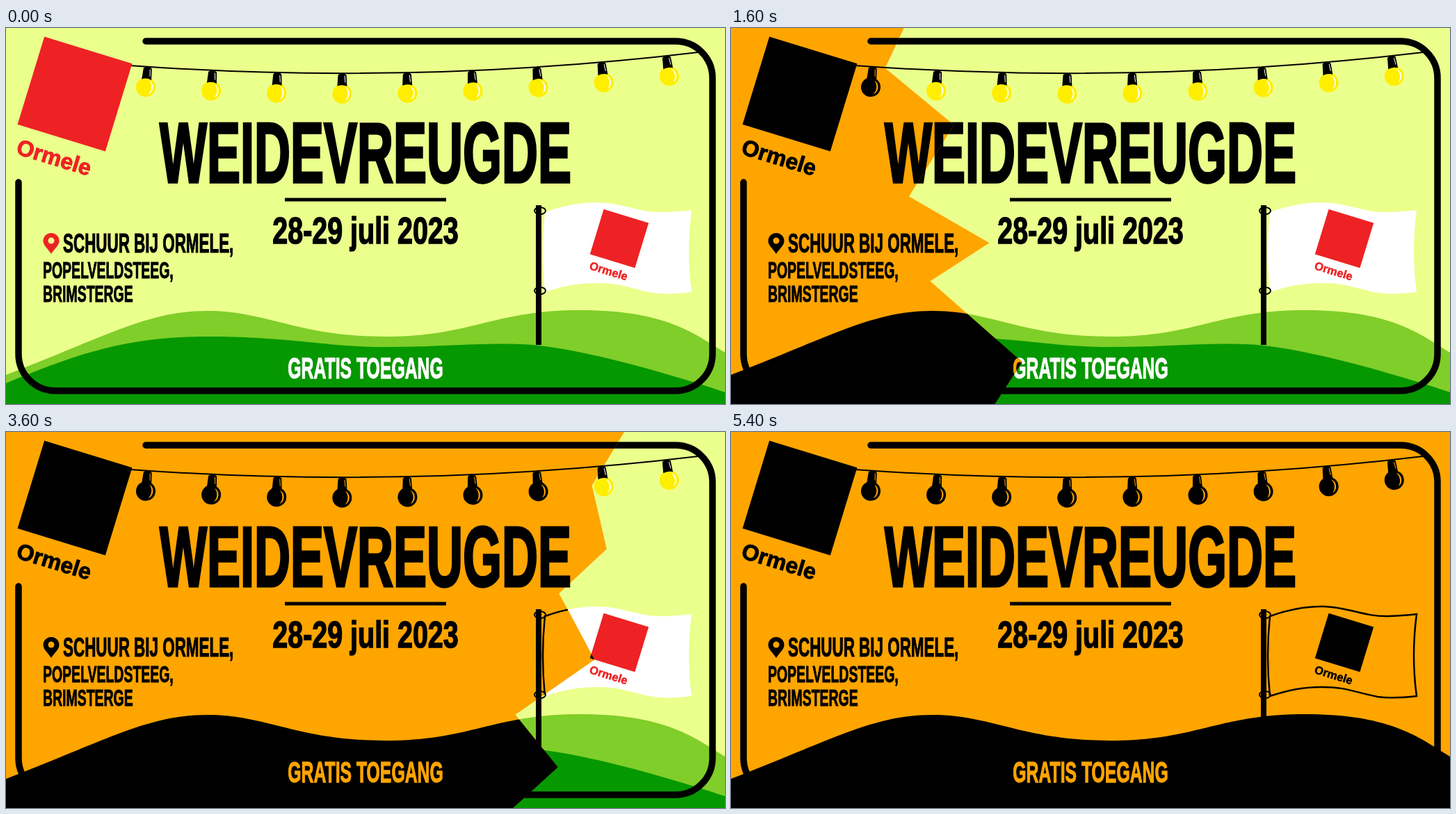
Recreate the animation shown at these times as an HTML page. Size 1034 by 541 pixels, loop 5.6 s.

```html
<!DOCTYPE html>
<html lang="nl">
<head>
<meta charset="utf-8">
<style>
  html, body { margin: 0; width: 100%; height: 100%; overflow: hidden; }
  svg { display: block; width: 1034px; height: 541px; }
  text { font-family: "Liberation Sans", Arial, sans-serif; font-weight: bold; stroke-width: .03em; }
</style>
</head>
<body>
<svg id="stage" viewBox="0 0 1034 541"></svg>
<script>
const HEIGHT = 541, LOOP = 5600, STEP = 200, LAST_STEP = LOOP / STEP - 1;
const CONDENSED = 0.59, SEMI_CONDENSED = 0.73;
const BULBS = 9, JAGS = 7;

const day = {
  sky: '#ebff8c', backHill: '#80ce29', frontHill: '#069800', accent: '#ee2224',
  bulb: '#ffee00', shine: '#fff', flag: '#fff', flagLine: 'none', entry: '#fff'
};
const night = {
  sky: '#ffa500', backHill: '#000', frontHill: '#000', accent: '#000',
  bulb: '#000', shine: '#ffa500', flag: '#ffa500', flagLine: '#000', entry: '#ffa500'
};

const label = (x, y, size, words, { color = '#000', anchor = 'start', squeeze = CONDENSED } = {}) =>
  `<text transform="translate(${x} ${y}) scale(${squeeze} 1)" font-size="${size}"
    text-anchor="${anchor}" fill="${color}" stroke="${color}">${words}</text>`;

// The wire hangs as a parabola from left to right
const wire = { left: 178, right: 995, from: 54, pull: 83.5, to: 35 };
const wireMiddle = (wire.left + wire.right) / 2;
function wireY(x) {
  const t = (x - wire.left) / (wire.right - wire.left);
  return (1 - t) ** 2 * wire.from + 2 * t * (1 - t) * wire.pull + t * t * wire.to;
}

function lamp(i, c) {
  const x = 201 + 94.1 * i;
  return `
  <g transform="translate(${x} ${wireY(x) + 29.5}) rotate(${6 - 1.8 * i})">
    <circle r="14" fill="${c.bulb}"/>
    <path d="M-7 -11 L-6 -27 Q0 -33 6 -27 L7 -11 Q0 -14 -7 -11Z"/>
    <path d="M4 -10 A11 11 0 0 1 4 10 A14 14 0 0 0 4 -10Z" fill="${c.shine}"/>
    <path d="M3.5 -26 L4.5 -16" stroke="${c.shine}"/>
  </g>`;
}
const lamps = c => Array.from({ length: BULBS }, (_, i) => lamp(i, c)).join('');

// Tilted badge with its caption, centred on the badge
const badge = (x, y, scale, color) => `
  <g transform="translate(${x} ${y}) scale(${scale}) rotate(17)" fill="${color}">
    <rect x="-66" y="-66" width="132" height="132"/>
    <text x="-57" y="107" font-size="32" stroke="${color}">Ormele</text>
  </g>`;

const scene = c => `
  <rect width="1034" height="541" fill="${c.sky}"/>
  <path fill="${c.backHill}" d="M0 499 C150 441 205 407 290 407 S420 444 545 444
    S700 406 825 406 S990 440 1034 467 V541 H0Z"/>
  <path fill="${c.frontHill}" d="M0 511 C100 470 170 444 290 444 S460 459 545 459
    S670 453 740 455 S930 490 1034 524 V541 H0Z"/>
  <g fill="none" stroke="#000">
    <path stroke-width="9.5" stroke-linecap="round" d="M201 19 H963 A53 53 0 0 1 1016 72
      V469 A53 53 0 0 1 963 522 H71 A53 53 0 0 1 18 469 V222"/>
    <path stroke-width="2" d="M${wire.left} ${wire.from} Q${wireMiddle} ${wire.pull} ${wire.right} ${wire.to}"/>
    <path stroke-width="5" d="M401 247 H633"/>
  </g>
  ${lamps(c)}
  ${badge(99, 95, 1, c.accent)}
  <path fill="${c.flag}" stroke="${c.flagLine}" stroke-width="2.5" d="M775 265
    C800 256 825 251 850 251 C885 251 910 266 945 265 Q970 264 986 262 Q978 322 986 380
    C960 383 945 383 930 381 C895 374 885 367 850 367 C820 367 800 372 775 380 Q769 322 775 265Z"/>
  <rect x="762" y="255" width="8" height="201"/>
  <g fill="none" stroke="#000" stroke-width="2">
    <ellipse cx="768" cy="263" rx="8" ry="5"/>
    <ellipse cx="768" cy="378" rx="8" ry="5"/>
  </g>
  ${badge(882, 303, 0.512, c.accent)}
  <path fill="${c.accent}" d="M65 325 C60 317 53.5 313 53.5 306.5 a11.5 11.5 0 0 1 23 0 C76.5 313 70 317 65 325Z"/>
  <circle cx="65" cy="306" r="4.5" fill="${c.sky}"/>
  ${label(517, 222, 122, 'WEIDEVREUGDE', { anchor: 'middle' })}
  ${label(517, 310, 54, '28-29 juli 2023', { anchor: 'middle', squeeze: SEMI_CONDENSED })}
  ${label(82, 323, 38, 'SCHUUR BIJ ORMELE,')}
  ${label(53, 360, 33, 'POPELVELDSTEEG,')}
  ${label(53, 394, 33, 'BRIMSTERGE')}
  ${label(517, 504, 42, 'GRATIS TOEGANG', { color: c.entry, anchor: 'middle' })}`;

document.getElementById('stage').innerHTML = `
  <clipPath id="wipe"><polygon id="edge"/></clipPath>
  ${scene(day)}
  <g clip-path="url(#wipe)">${scene(night)}</g>`;

function random(seed) {
  const n = Math.sin(seed * 12.9898) * 43758.5453;
  return n - Math.floor(n);
}

// A fresh zigzag on every step; the line moves right, leaning one way and then the other
function edgeAt(step) {
  const u = step / LAST_STEP;
  const front = 1200 * u - 90 + 100 * Math.sin(Math.PI * u ** 1.5);
  const lean = 80 * Math.cos(7 * u * u);
  const rough = Math.sqrt(Math.abs(Math.sin(Math.PI * u)));
  return Array.from({ length: JAGS + 1 }, (_, i) => {
    const seed = step * 20 + i * 2;
    const inner = i > 0 && i < JAGS;
    const down = (i + (inner ? 0.6 * (random(seed) - 0.5) : 0)) / JAGS;
    const jag = inner ? (i % 2 ? -1 : 1) * (20 + 50 * random(seed + 1)) * rough : 0;
    return [front + lean * (2 * down - 1) + jag, down * HEIGHT];
  });
}

const edge = document.getElementById('edge');
function draw(now) {
  const points = edgeAt(Math.floor(now % LOOP / STEP));
  edge.setAttribute('points', [[-200, 0], ...points, [-200, HEIGHT]].join(' '));
  requestAnimationFrame(draw);
}
draw(0);
</script>
</body>
</html>
```
